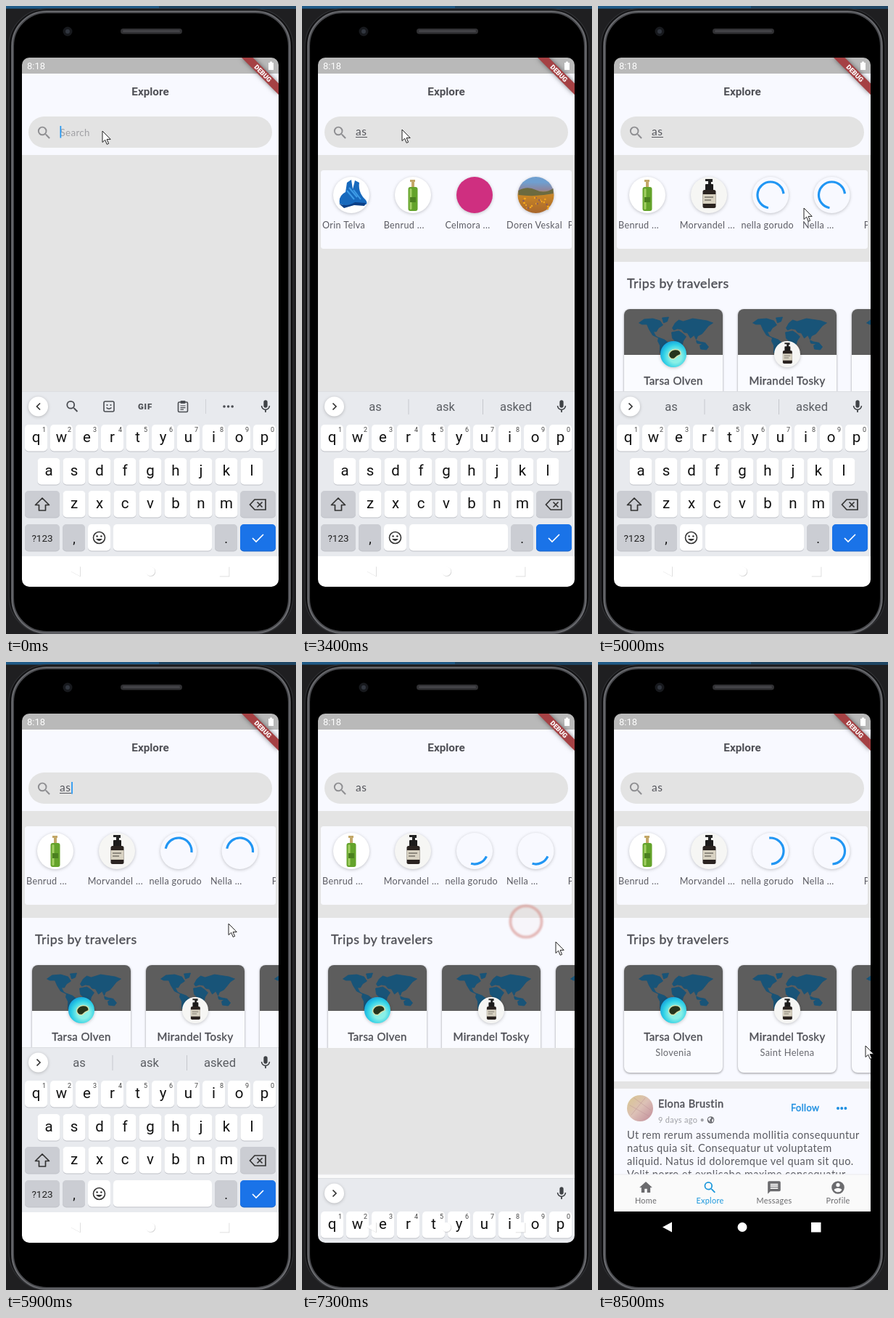
An HTML page that plays this animation: 400x864 px, repeating every 8.6 s.

```html
<!DOCTYPE html>
<html lang="en">
<head>
<meta charset="utf-8">
<title>Explore search</title>
<style>
  html, body { margin: 0; width: 100%; height: 100%; overflow: hidden; background: #1f1f21; }
  svg { display: block; width: 100vw; height: 100vh; }
  text { white-space: pre; }
  .app { font-family: Lato, "Open Sans", sans-serif; letter-spacing: .028em; }
  .sys { font-family: Roboto, Arial, sans-serif; }
  .mid { text-anchor: middle; }
  .heavy { stroke: currentColor; stroke-width: .4; }
  .soft { filter: drop-shadow(0 1px 2px rgba(0, 0, 0, .22)); }
  .card { filter: drop-shadow(0 1px 1.5px rgba(0, 0, 0, .4)); }
  .ribbon { filter: drop-shadow(0 0 3px rgba(0, 0, 0, .5)); }
</style>
</head>
<body>
<svg id="stage" viewBox="0 0 400 864" preserveAspectRatio="none"></svg>
<script>
const LOOP = 8600, STEP = 100;
const PALE = '#f8f9ff', GREY = '#e4e4e4', BLUE = '#2196f3', INK = '#505157', ICON = '#4a4d52';

const ICONS = {
  search: 'M15.5 14h-.79l-.28-.27A6.47 6.47 0 0 0 16 9.5 6.5 6.5 0 1 0 9.5 16c1.61 0 3.09-.59 4.23-1.57l.27.28v.79l5 4.99L20.49 19zm-6 0a4.5 4.5 0 1 1 0-9 4.5 4.5 0 0 1 0 9z',
  mic: 'M12 14a3 3 0 0 0 3-3V5a3 3 0 0 0-6 0v6a3 3 0 0 0 3 3zm5.3-3c0 3-2.54 5.1-5.3 5.1S6.7 14 6.7 11H5c0 3.41 2.72 6.23 6 6.72V21h2v-3.28c3.28-.48 6-3.3 6-6.72z',
  home: 'M10 20v-6h4v6h5v-8h3L12 3 2 12h3v8z',
  chat: 'M20 2H4a2 2 0 0 0-2 2v18l4-4h14a2 2 0 0 0 2-2V4a2 2 0 0 0-2-2zm-2 12H6v-2h12zm0-3H6V9h12zm0-3H6V6h12z',
  user: 'M12 2a10 10 0 1 0 0 20 10 10 0 0 0 0-20zm0 3a3 3 0 1 1 0 6 3 3 0 0 1 0-6zm0 14.2c-2.5 0-4.71-1.28-6-3.22.03-1.99 4-3.08 6-3.08s5.97 1.09 6 3.08a7.2 7.2 0 0 1-6 3.22z'
};
const LAND = 'M1 9L8 4 20 3 30 6 34 12 28 16 25 21 21 21 24 27 29 30 20 26 15 18 12 11 5 11z' +
  'M33 2L42 1 40 7 35 9zM28 29L36 32 41 36 36 43 33 51 30 50 30 40 27 34z' +
  'M47 16L51 9 56 5 62 7 75 3 95 6 103 9 97 13 93 18 88 24 82 27 80 32 77 26 72 30 68 23 63 22 60 18 54 17 49 19z' +
  'M46 22L56 20 62 24 66 28 62 34 60 42 56 45 53 36 47 30zM85 40L92 36 97 42 94 46 86 45zM80 33l5 2 6 1-2 2-8-1z';

// Markup helpers
const rect = (x, y, w, h, fill, rx = 0, more = '') =>
  `<rect x="${x}" y="${y}" width="${w}" height="${h}" rx="${rx}" fill="${fill}" ${more}/>`;
const disc = (x, y, r, fill, more = '') => `<circle cx="${x}" cy="${y}" r="${r}" fill="${fill}" ${more}/>`;
const path = (d, fill, more = '') => `<path d="${d}" fill="${fill}" ${more}/>`;
const line = (d, color, w, more = '') => path(d, 'none', `stroke="${color}" stroke-width="${w}" ${more}`);
const text = (x, y, s, size, fill, cls = 'app', more = '') =>
  `<text x="${x}" y="${y}" font-size="${size}" fill="${fill}" color="${fill}" class="${cls}" ${more}>${s}</text>`;
const group = (body, more = '') => `<g ${more}>${body}</g>`;
const at = (x, y, body, k = 1) => group(body, `transform="translate(${x} ${y}) scale(${k})"`);
const icon = (name, x, y, k, fill) => at(x - 12 * k, y - 12 * k, path(ICONS[name], fill), k);
const many = (n, fn) => Array.from({ length: n }, (_, i) => fn(i)).join('');

// Round pictures, drawn around 0,0 with radius 25
const ART = {
  shoes: disc(0, 0, 25, '#fff') +
    path('M-16 12Q-18 1-8-4L-6-17 0-21 2-8 5-20 11-17Q9-3 20 7 24 13 17 14L6 12-6 16z', '#1769bd') +
    path('M-17 12Q-6 17 5 10L20 11 18 15 4 14-10 18z', '#0b3f86') +
    line('M-6-6L4 6M-3-10L8 3M3-7L13 6', '#3d9be6', 2),
  spray: disc(0, 0, 25, '#fff') +
    path('M-4-21H3V-18H2V-11H-2V-18H-4z', '#c3a768') +
    rect(-6.5, -11, 13, 33, '#64a32b', 3) + rect(-4.5, -9, 3, 29, '#a2cf63', 1.5) +
    rect(-4, 3, 8, 7, '#4b801f'),
  badge: disc(0, 0, 25, '#cf2f80'),
  field: disc(0, 0, 25, 'url(#field)') + path('M-24-6Q-12-13 0-7T24-9L24-2Q0 3-24 0z', '#6c6a3f') +
    many(26, i => disc(Math.sin(i * 5.1) * 17, 4 + (i * 7 % 16), 1.3, i % 3 ? '#f2a51f' : '#8a5a5c')),
  serum: disc(0, 0, 25, '#f6f6f4') + path('M-5-22H5V-18H3V-14H-1V-19H-5z', '#222') +
    rect(-5, -15, 11, 9, '#1c1b1b', 1) + rect(-8.5, -7, 18, 25, '#2a2320', 2.5) + rect(-8.5, -1, 18, 13, '#d8d2c2') +
    line('M-6 3H6M-6 7H3', '#77736a', 1.3),
  isle: disc(0, 0, 25, 'url(#sea)') + path('M-10 2Q-10-8 3-10 17-9 15 1 7 4 2 10-8 11-10 2z', '#d3e3b0') +
    path('M-8 2Q-7-7 3-8 14-8 13 0 6 2 1 8-6 9-8 2z', '#26341c'),
  sand: disc(0, 0, 25, 'url(#sand)') + line('M-20-6L17 15M-12-20L21 4M-17 13L10-20', '#b98f92', 1, 'opacity=".6"')
};
const avatar = (name, x, y, r = 25) => group(at(x, y, ART[name], r / 25), 'class="soft"');
const COLS = [68, 153, 238, 322.5];
const names = list => list.map((s, i) => text(28 + i * 84.7, 305.5, s, 12.6, '#5c5c63')).join('');

// The body has a grey metal rim with a thin highlight
const phone = rect(0, 0, 400, 864, '#1f1f21') + rect(0, 0, 400, 4, '#1f4664') + rect(0, 0, 211, 3, '#205b88') +
  rect(4, 4, 392, 860, '#0c0c0d', 52, 'stroke="#2c2d30" stroke-width="1.5"') +
  rect(9, 8, 382, 854, '#000', 47, 'stroke="#48494d" stroke-width="4"') +
  rect(8.5, 7.5, 383, 855, 'none', 47.5, 'stroke="#77787c" stroke-width="1.2"') +
  disc(85, 35, 6.5, '#17191d') + disc(85, 35, 3, '#31363f') +
  rect(158, 31, 85, 7.5, '#303033', 3.7) + rect(161, 33, 79, 3, '#434347', 1.5);

const header = rect(22, 71, 354, 22, '#b9b9b9') + rect(22, 93, 354, 112, PALE) +
  text(29, 87, '8:18', 13, '#fff', 'sys') +
  path('M362 78h2v-1.5h3V78h2v10h-7z', '#fff') +
  path('M325 71H340.4L376 106.6V122z', '#a54144', 'class="ribbon"') +
  text(0, 3.2, 'DEBUG', 9.2, '#fff', 'sys mid', 'font-weight="900" transform="translate(354.4 92.6) rotate(45)"') +
  text(199, 123.4, 'Explore', 15.3, INK, 'sys mid', 'font-weight="700"') +
  rect(31, 152, 336, 43, '#e3e3e3', 21.5) + icon('search', 52.6, 174.4, .97, '#8f8f92') +
  text(74.5, 178.5, 'Search', 13.3, '#a0a0a4', 'app', 'id="hint"') +
  text(74, 178.3, '', 15.5, '#55565c', 'app', 'id="typed"') +
  rect(74, 180, 16, 1, '#55565c', 0, 'id="under"') +
  rect(0, 165, 1.7, 16.5, BLUE, 0, 'id="caret"');

const people = group(
  rect(26, 226, 346, 108, PALE, 3) +
  group(names(['Orin Telva', 'Benrud ...', 'Celmora ...', 'Doren Veskal', 'P']) +
    group(['shoes', 'spray', 'badge', 'field'].map((a, i) => avatar(a, COLS[i], 260)).join(''), 'id="pics"'), 'id="all"') +
  group(names(['Benrud ...', 'Morvandel ...', 'nella gorudo', 'Nella ...', 'P']) +
    avatar('spray', COLS[0], 260) + avatar('serum', COLS[1], 260) +
    [2, 3].map(i => disc(COLS[i], 260, 25, PALE, 'class="soft"') +
      at(COLS[i], 260, line('', BLUE, 3.2, 'class="spin"'))).join(''), 'id="found"'),
  'id="people" clip-path="url(#row)"');

const trip = (x, name, place, pic) => group(
  rect(x, 417, 136, 148, '#fafbff', 8), 'class="card"') +
  path(`M${x} 480V425a8 8 0 0 1 8-8h120a8 8 0 0 1 8 8V480z`, '#5d5d5d') +
  at(x + 19.5, 427, path(LAND, '#185478', 'stroke="#185478" stroke-width=".8" stroke-linejoin="round"')) +
  (name ? avatar(pic, x + 68, 479, 18) + text(x + 68, 521, name, 15, INK, 'app mid heavy') +
    text(x + 68, 542, place, 12.8, '#66676d', 'app mid') : '');
const trips = group(rect(22, 352, 354, 225, PALE) +
  text(40, 387.5, 'Trips by travelers', 17.75, INK, 'app heavy') +
  trip(36, 'Tarsa Olven', 'Slovenia', 'isle') + trip(193, 'Mirandel Tosky', 'Saint Helena', 'serum') + trip(350), 'id="trips"');

const POST = ['Ut rem rerum assumenda mollitia consequuntur', 'natus quia sit. Consequatur ut voluptatem',
  'aliquid. Natus id doloremque vel quam sit quo.', 'Velit porro et explicabo maxime consequatur'];
const post = group(rect(22, 587, 354, 118, PALE) + at(58, 614, ART.sand, .72) +
  text(83, 613, 'Elona Brustin', 14.6, INK, 'app heavy') + text(83, 634, '9 days ago •', 11, '#a0a1a6') +
  disc(155.5, 630, 4.8, '#6c6d72') + path('M152 628l3-2 1 2-2 2 1 3-3-3zM157 630l2-2v4l-2 1z', PALE) +
  text(266, 618, 'Follow', 12.8, '#1e8fe0', 'app heavy') + many(3, i => disc(331 + i * 5.2, 614, 2, '#1e8fe0')) +
  POST.map((s, i) => text(40, 656 + i * 18, s, 14.55, '#5a5b61')).join(''), 'id="post"');

const tabs = rect(22, 705, 354, 51, '#fafafa') + rect(22, 704.5, 354, 1, '#ececf0') +
  [['home', 'Home', 66], ['search', 'Explore', 154.5], ['chat', 'Messages', 243], ['user', 'Profile', 331]]
    .map(([name, label, x], i) => {
      const color = i === 1 ? '#1b97dc' : '#6b6b6e';
      return icon(name, x, 723, .88, color) + text(x, 745, label, 10.9, color, 'app mid');
    }).join('');

// Keyboard
const key = (x, y, w, fill = '#fff', edge = '#bfc2c8') => rect(x, y + 1, w, 36.5, edge, 5) + rect(x, y, w, 36.5, fill, 5);
const letters = (row, first, y) => [...row].map((c, i) => {
  const x = first + i * 35;
  return key(x - 15.5, y, 31) + text(x, y + 24, c, 20.5, '#111', 'sys mid') +
    (y < 600 ? text(x + 11, y + 10, (i + 1) % 10, 9, '#444', 'sys mid') : '');
}).join('');
const DARK = '#cbcdd3';
const keyboard = group(rect(22, 531, 354, 226, '#e8eaee') + rect(22, 530, 354, 1, '#dcdee2') + rect(22, 757, 354, 60, '#fff') +
  disc(44.5, 551, 13.5, '#fff', 'class="soft"') + line('', '#333', 1.7, 'id="chevron"') +
  icon('mic', 358, 551, .88, '#3f4246') +
  group(icon('search', 91.5, 551, .9, ICON) +
    rect(135, 544, 14, 14, 'none', 2, `stroke="${ICON}" stroke-width="1.6"`) +
    disc(139.5, 549, 1.1, ICON) + disc(144.5, 549, 1.1, ICON) + line('M138.5 552.5Q142 556 145.5 552.5', ICON, 1.5) +
    text(192, 555.2, 'GIF', 11.5, ICON, 'sys mid', 'font-weight="900" letter-spacing=".8"') +
    rect(237.5, 545, 13, 13.5, 'none', 1.5, `stroke="${ICON}" stroke-width="1.6"`) + rect(240.5, 543, 7, 4, ICON, 1) +
    line('M240.5 550H247.5M240.5 552.6H247.5M240.5 555.2H245', ICON, 1.2) +
    rect(275, 541, 1, 20, '#cfd1d6') + many(3, i => disc(301 + i * 5.6, 551, 1.8, ICON)), 'id="tools"') +
  group(text(101, 557.3, 'as', 16.6, '#5a5d62', 'sys mid') + text(198, 557.3, 'ask', 16.6, '#5a5d62', 'sys mid') +
    text(295, 557.3, 'asked', 16.6, '#5a5d62', 'sys mid') +
    rect(146.5, 541, 1, 21, '#c6c8cd') + rect(249, 541, 1, 21, '#c6c8cd'), 'id="words"') +
  letters('qwertyuiop', 41.5, 576) + letters('asdfghjkl', 59, 622) + letters('zxcvbnm', 94, 667) +
  key(26, 667, 48, DARK) + line('M50 677L59.5 686.5H54.5V694H45.5V686.5H40.5z', '#333', 1.7, 'stroke-linejoin="round"') +
  key(323, 667, 49, DARK) + line('M343 679H358V693H343L336.5 686zM346.5 682.5L353.5 689.5M353.5 682.5L346.5 689.5', '#333', 1.7) +
  key(26, 713, 48, DARK) + text(50, 736.7, '?123', 13.5, '#222', 'sys mid') +
  key(78, 713, 31, DARK) + text(94, 739, ',', 18, '#111', 'sys mid') +
  key(113, 713, 31) + disc(128.5, 731.5, 8, 'none', 'stroke="#333" stroke-width="1.6"') +
  disc(125.6, 729.5, 1.3, '#333') + disc(131.4, 729.5, 1.3, '#333') + path('M124 733H133Q128.5 739 124 733z', '#333') +
  key(148, 713, 136) + key(288, 713, 31, DARK) + text(303.5, 739, '.', 18, '#111', 'sys mid') +
  key(323, 713, 49, '#1a73e8', '#1662c8') + line('M340 732L345 737 355 727', '#fff', 1.7), 'id="keyboard"');

const NAV = 'M89 777.5L102 770.5V784.5zM192.5 777.5a6.5 6.5 0 1 1 13 0a6.5 6.5 0 1 1-13 0zM294 771h13.5v13.5h-13.5z';
const navIcons = path(NAV, 'rgba(0,0,0,.16)', 'transform="translate(.8 .8)"') + path(NAV, '#fff');

const stage = document.getElementById('stage');
stage.innerHTML = `<defs>
  <clipPath id="screen">${rect(22, 71, 354, 728, '#fff', 10)}</clipPath>
  <clipPath id="row">${rect(26, 226, 346, 108, '#fff', 3)}</clipPath>
  <clipPath id="view">${rect(22, 205, 354, 326, '#fff', 0, 'id="viewRect"')}</clipPath>
  <linearGradient id="field" x2="0" y2="1"><stop offset=".15" stop-color="#6f9fd0"/><stop offset=".35" stop-color="#8b86a0"/>
    <stop offset=".5" stop-color="#c98626"/><stop offset="1" stop-color="#a8662c"/></linearGradient>
  <radialGradient id="sea" cx=".58" cy=".6" r=".65"><stop offset=".35" stop-color="#8af0e6"/><stop offset=".7" stop-color="#2fd0e6"/><stop offset="1" stop-color="#149ddb"/></radialGradient>
  <linearGradient id="sand" x2="1" y2="1"><stop stop-color="#d9c78f"/><stop offset=".5" stop-color="#dcc0b6"/><stop offset="1" stop-color="#c08a98"/></linearGradient>
</defs>` + phone + group(
  rect(22, 71, 354, 728, '#000') + rect(22, 205, 354, 500, GREY) + header +
  group(people + trips + post, 'clip-path="url(#view)"') + tabs + keyboard + navIcons, 'clip-path="url(#screen)"') +
  disc(309, 357, 20, 'rgba(240,225,225,.3)', 'id="ring" stroke="#d58a84" stroke-width="4" style="filter:blur(1.3px)"') +
  path('M1 0V15.5L4.7 12.2 7.2 18.3 9.6 17.3 7.1 11.4H12.2z', '#fff', 'id="mouse" stroke="#222" stroke-width="1"');

const el = {};
stage.querySelectorAll('[id]').forEach(e => el[e.id] = e);
const spinners = stage.querySelectorAll('.spin');

// Motion helpers
const show = (e, on) => e.setAttribute('visibility', on ? 'inherit' : 'hidden');
const clamp = v => Math.min(1, Math.max(0, v));
function track(keys, t) {
  const i = keys.findIndex(k => k[0] > t);
  if (i === 0) return keys[0].slice(1);
  if (i < 0) return keys[keys.length - 1].slice(1);
  const a = keys[i - 1], b = keys[i], f = (t - a[0]) / (b[0] - a[0]);
  return a.slice(1).map((v, j) => v + (b[j + 1] - v) * f);
}
// cubic-bezier(.4, 0, .2, 1)
function ease(x) {
  let lo = 0, hi = 1;
  for (let i = 0; i < 24; i++) {
    const m = (lo + hi) / 2, n = 1 - m;
    if (1.2 * n * n * m + .6 * n * m * m + m * m * m < x) lo = m; else hi = m;
  }
  return 3 * (1 - lo) * lo * lo + lo ** 3;
}
function spinArc(u) {
  const p = u % 1333 / 1333, head = ease(clamp(p * 2)), tail = ease(clamp(p * 2 - 1));
  const start = -90 + 270 * tail + 90 * p + 360 * u / 2222;
  const sweep = Math.max(270 * (head - tail), 1);
  const point = d => `${18 * Math.cos(d * Math.PI / 180)} ${18 * Math.sin(d * Math.PI / 180)}`;
  return `M${point(start)}A18 18 0 ${sweep > 180 ? 1 : 0} 1 ${point(start + sweep)}`;
}

const MOUSE = [[3300, 132, 172], [3400, 137, 170], [4000, 283, 278], [5100, 283, 278], [5900, 306, 360],
  [6500, 309, 357], [7100, 309, 357], [7300, 349, 385], [7800, 376, 470], [8500, 368, 528]];
const SLIDE = [[6900, 0], [7000, 6], [7100, 40], [7200, 108], [7300, 180], [7400, 236], [7500, 275]];
const SPIN = [[4300, 97], [5900, 1613], [7300, 2850], [8500, 4288]];
const BLINKS = [1000, 1500, 2100, 2500, 3100, 3500, 4000, 4500, 5000, 5500, 6000, 6500, 7000];

function draw(t) {
  const typed = t < 100 ? '' : t < 200 ? 'a' : 'as';
  const focused = t < 7000;
  el.typed.textContent = typed;
  show(el.hint, !typed);
  show(el.under, typed && focused);
  el.under.setAttribute('width', typed.length * 8);
  show(el.caret, BLINKS.filter(b => b <= t).length % 2 === 0);
  el.caret.setAttribute('x', typed ? 74.2 + typed.length * 8 : 74.5);
  el.caret.setAttribute('opacity', (t >= 1800 && t < 2100) || (t >= 2800 && t < 3100) ? .85 : 1);

  const swap = clamp((t - 100) / 500);
  el.tools.setAttribute('opacity', clamp(1 - swap * 2));
  el.words.setAttribute('opacity', focused ? clamp(swap * 2 - 1) : 0);
  el.chevron.setAttribute('d', swap < .5 ? 'M47 546.5L42.5 551 47 555.5' : 'M42.5 546.5L47 551 42.5 555.5');
  const [drop] = track(SLIDE, t);
  el.keyboard.setAttribute('transform', `translate(0 ${drop})`);
  show(el.keyboard, drop < 270);

  show(el.people, t >= 2500);
  show(el.all, t >= 2500 && t < 4300);
  show(el.pics, t >= 2600 && t < 4300);
  show(el.found, t >= 4300);
  show(el.trips, t >= 4800);
  show(el.post, t >= 7900);
  el.viewRect.setAttribute('height', t < 7600 ? 326 : 500);
  const arc = spinArc(track(SPIN, t)[0]);
  spinners.forEach(s => s.setAttribute('d', arc));

  const click = (t - 7000) / 500;
  show(el.ring, click > 0 && click < 1);
  el.ring.setAttribute('r', 12 + 16 * clamp(click));
  el.ring.setAttribute('opacity', clamp(1.4 * (1 - click)));
  el.mouse.setAttribute('transform', `translate(${track(MOUSE, t).join(' ')})`);
}

const begin = performance.now();
function tick() {
  const t = (performance.now() - begin) % LOOP;
  draw(Math.floor(t / STEP) * STEP);
  requestAnimationFrame(tick);
}
tick();
</script>
</body>
</html>
```
